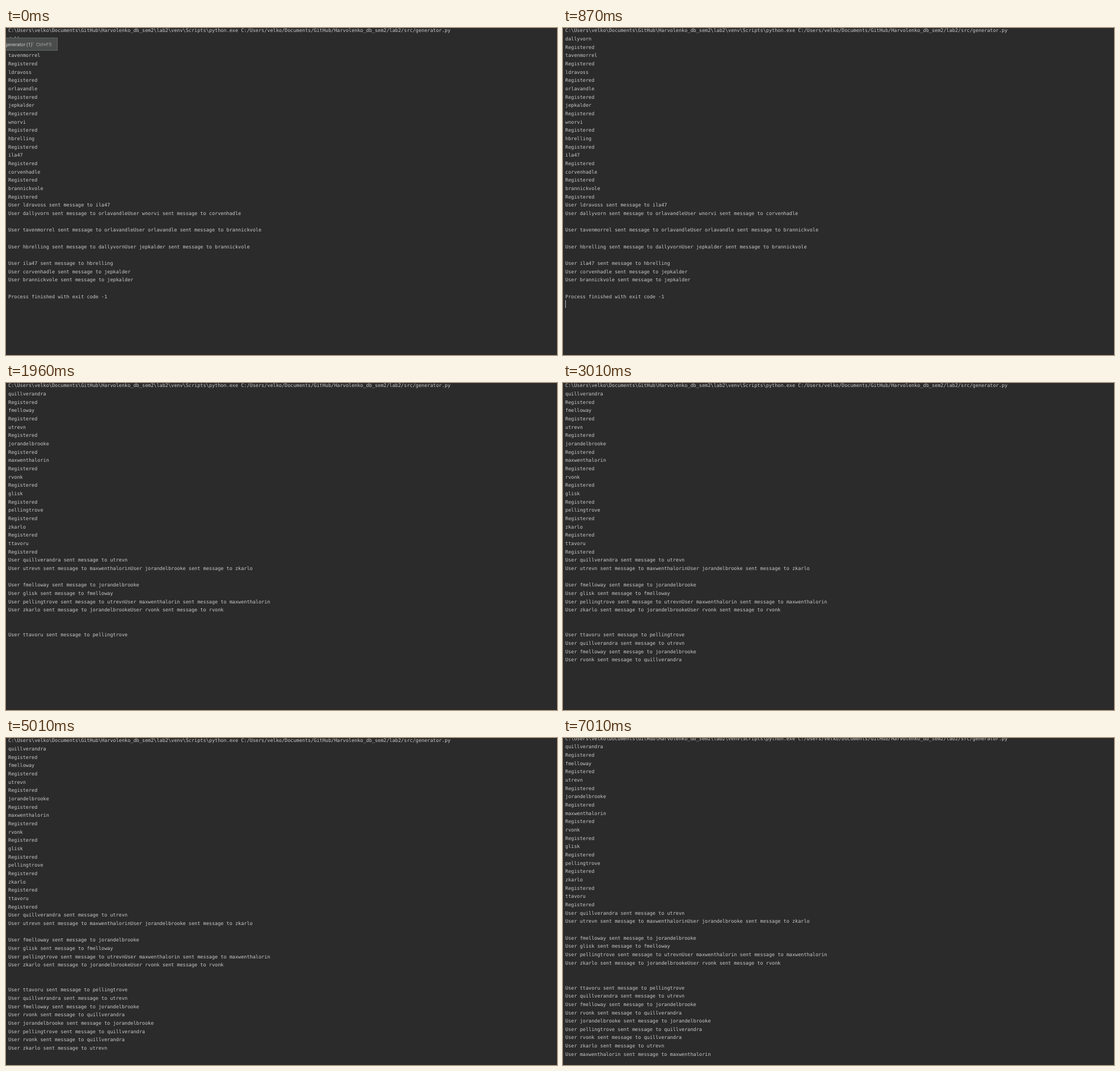
An HTML page with a canvas for the animation above (8000 ms loop, 971 px wide and 577 px high).

```html
<!DOCTYPE html>
<html lang="en">
<head>
<meta charset="utf-8">
<title>Console run</title>
<style>
  html, body { margin: 0; width: 100%; height: 100%; overflow: hidden; background: #2b2b2b; }
  canvas { display: block; }
</style>
</head>
<body>
<canvas id="stage" width="971" height="577"></canvas>
<script>
const ctx = document.getElementById('stage').getContext('2d', { alpha: false });
const LOOP = 8000, LINE = 14.66, LEFT = 4, BASELINE = 7.4;

const command = 'C:\\Users\\velko\\Documents\\GitHub\\Harvolenko_db_sem2\\lab2\\venv\\Scripts\\python.exe ' +
  'C:/Users/velko/Documents/GitHub/Harvolenko_db_sem2/lab2/src/generator.py';

const register = names => names.split(' ').flatMap(name => [name, 'Registered']);

// "a>b" is one message, "a>b c>d" two on one line, "" a blank line
const messages = (...rows) => rows.map(row =>
  row.replace(/(\w+)>(\w+) ?/g, 'User $1 sent message to $2'));

const firstRun = [
  command,
  ...register('dallyvorn tavenmorrel ldravoss orlavandle jepkalder wnorvi hbrelling ila47 corvenhadle brannickvole'),
  ...messages(
    'ldravoss>ila47',
    'dallyvorn>orlavandle wnorvi>corvenhadle', '',
    'tavenmorrel>orlavandle orlavandle>brannickvole', '',
    'hbrelling>dallyvorn jepkalder>brannickvole', '',
    'ila47>hbrelling',
    'corvenhadle>jepkalder',
    'brannickvole>jepkalder', ''),
  'Process finished with exit code -1'
];

const secondRun = [
  command,
  ...register('quillverandra fmelloway utrevn jorandelbrooke maxwenthalorin rvonk glisk pellingtrove zkarlo ttavoru'),
  ...messages(
    'quillverandra>utrevn',
    'utrevn>maxwenthalorin jorandelbrooke>zkarlo', '',
    'fmelloway>jorandelbrooke',
    'glisk>fmelloway',
    'pellingtrove>utrevn maxwenthalorin>maxwenthalorin',
    'zkarlo>jorandelbrooke rvonk>rvonk', '', '',
    'ttavoru>pellingtrove',
    'quillverandra>utrevn',
    'fmelloway>jorandelbrooke',
    'rvonk>quillverandra',
    'jorandelbrooke>jorandelbrooke',
    'pellingtrove>quillverandra',
    'rvonk>quillverandra',
    'zkarlo>utrevn',
    'maxwenthalorin>maxwenthalorin')
];

// [start time, visible lines of the second run]
const steps = [[1090, 1], [1960, 31], [3010, 34], [4010, 37], [5010, 38], [7010, 39]];

function rect(color, x, y, w, h) {
  ctx.fillStyle = color;
  ctx.fillRect(x, y, w, h);
}

function text(string, x, y, color, font, align = 'left') {
  ctx.font = font;
  ctx.textAlign = align;
  ctx.textRendering = 'geometricPrecision';
  ctx.fillStyle = color;
  ctx.fillText(string, x, y);
}

function drawLines(lines, scroll = 0) {
  lines.forEach((line, row) =>
    text(line, LEFT, BASELINE + row * LINE - scroll, '#cacaca', '8.525px "DejaVu Sans Mono", monospace'));
}

function drawTooltip() {
  const font = '8.4px Roboto, sans-serif';
  rect('#636565', 0, 17, 91, 23);
  rect('#4b4d4d', 0, 18, 90, 21);
  text("generator (1)'", 48, 32, '#cacaca', font, 'right');
  text('Ctrl+F5', 53, 32, '#a4a4a4', font);
}

function draw() {
  const t = performance.now() % LOOP;
  rect('#2b2b2b', 0, 0, 971, 577);
  if (t < steps[0][0]) {
    drawLines(firstRun);
    if (t < 870) drawTooltip();
    else rect('#bbbbbb', LEFT, 480, 1, 14);
  } else {
    const [, count] = steps.findLast(([start]) => t >= start);
    drawLines(secondRun.slice(0, count), t >= 7010 ? LINE / 4 : 0);
  }
  requestAnimationFrame(draw);
}
draw();
</script>
</body>
</html>
```
